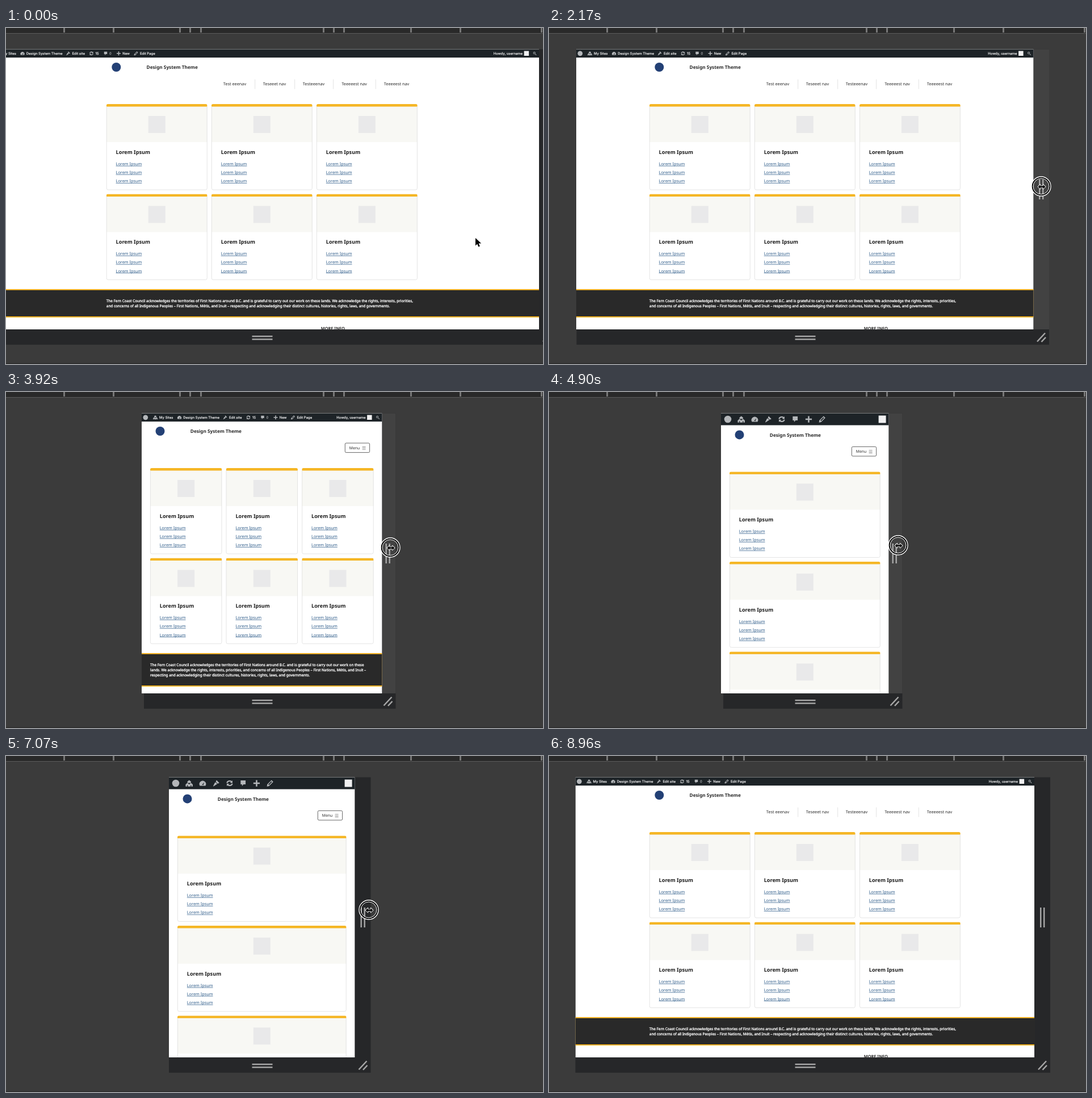
An HTML page with a canvas for the animation above (9100 ms loop, 946x592 px).

```html
<!DOCTYPE html>
<html lang="en">
<head>
<meta charset="utf-8">
<title>Responsive resize</title>
<style>
html, body { margin: 0; width: 100%; height: 100%; overflow: hidden; background: #3b3b3b; }
canvas { display: block; }
</style>
</head>
<body>
<canvas id="stage" width="946" height="592"></canvas>
<script>
const ctx = document.getElementById('stage').getContext('2d');
const LOOP = 9100, STEP = 70;
const SANS = '"Noto Sans", sans-serif', UI = 'Inter, sans-serif';
const GOLD = '#f5b625', INK = '#292929', PANEL = '#262729', GRIP = '#a8a8a8', LINK = '#2c5a88';
const STATEMENT = 'The Fern Coast Council acknowledges the territories of First Nations around B.C. and is grateful to carry out our work on these lands. We acknowledge the rights, interests, priorities, and concerns of all Indigenous Peoples – First Nations, Métis, and Inuit – respecting and acknowledging their distinct cultures, histories, rights, laws, and governments.';

// time, frame left, page left, content shortfall, pointer x, pointer y
const KEYS = [
  [0, -37.5, -37.5, 0, 827, 370],
  [350, -37.5, -37.5, 0, 955, 275],
  [1190, -37.5, -37.5, 0, 955, 275],
  [2170, 48.5, 48, 0, 867, 279],
  [3150, 171, 167, 0, 752, 276],
  [3920, 243, 239, 0, 677, 274],
  [4130, 258, 254, 0, 668, 273],
  [4900, 307, 303, 0, 615, 270],
  [5110, 307, 303, 0, 606, 270],
  [5250, 320, 320, 0, 606, 270],
  [6300, 320, 320, 0, 606, 270],
  [7070, 287, 287, 0, 639, 271],
  [7350, 266, 268, 4, 663, 270],
  [7770, 202, 213.5, 17, 733, 269],
  [8310, 46.5, 46.5, 0, 875, 270],
  [8400, 46.5, 46.5, 0, 868, 290],
  [8820, 46.5, 46.5, 0, 868, 568],
  [LOOP, 46.5, 46.5, 0, 868, 568]
];

// Icons on a 20 x 20 grid
const ICONS = {
  sites: 'M10 1l5 4v4H5V5zM5 9l5 4v6H0v-6zM15 9l5 4v6H10v-6zM4 15h2v4H4zM14 15h2v4h-2z',
  gauge: 'M2 17a9.3 9.3 0 1 1 16 0zM8.5 14l6-7-3 8.5z',
  brush: 'M11 1l8 8-5 2-5-5zM8 7l5 5-2 1-9 6v-2l4-8z',
  refresh: 'M1 9a9 8 0 0 1 15-5l2-2v7h-7l2.5-2.5a5.5 5 0 0 0-9 2.5zM19 11a9 8 0 0 1-15 5l-2 2v-7h7l-2.5 2.5a5.5 5 0 0 0 9-2.5z',
  comment: 'M3 2h14v11h-6l-4 5v-5H3z',
  plus: 'M8 1h4v7h7v4h-7v7H8v-7H1V8h7z',
  pencil: 'M14 1l5 5L7 18l-6 1 1-6zM13.5 4.5L5 13l2 2 8.5-8.5z',
  search: 'M8 2a6 6 0 1 0 0 12a6 6 0 1 0 0-12zM8 4.5a3.5 3.5 0 1 1 0 7a3.5 3.5 0 1 1 0-7zM12 14l2-2 5 5-2 2z'
};
for (const name in ICONS) ICONS[name] = new Path2D(ICONS[name]);

const ARROW = new Path2D('M0 0v13.5l3.2-3 2.1 5 2.5-1.1-2.1-4.8h4.5z');
const RESIZE = new Path2D('M-6.5 0l4-3.8v2.6h5v-2.6l4 3.8-4 3.8v-2.6h-5v2.6z');

function rect(x, y, w, h, color) {
  ctx.fillStyle = color;
  ctx.fillRect(x, y, w, h);
}

function text(str, x, y, size, color, { weight = 400, family = SANS, align = 'left', bleed = 0 } = {}) {
  ctx.font = `${weight} ${size}px ${family}`;
  ctx.textAlign = align;
  ctx.fillStyle = ctx.strokeStyle = color;
  ctx.fillText(str, x, y);
  if (bleed) {
    ctx.lineWidth = bleed;
    ctx.strokeText(str, x, y);
  }
}

function dot(x, y, r, color) {
  ctx.fillStyle = color;
  ctx.beginPath();
  ctx.arc(x, y, r, 0, 7);
  ctx.fill();
}

function ring(x, y, r, width, color) {
  ctx.strokeStyle = color;
  ctx.lineWidth = width;
  ctx.beginPath();
  ctx.arc(x, y, r, 0, 7);
  ctx.stroke();
}

function line(x1, y1, x2, y2, width, color) {
  ctx.strokeStyle = color;
  ctx.lineWidth = width;
  ctx.beginPath();
  ctx.moveTo(x1, y1);
  ctx.lineTo(x2, y2);
  ctx.stroke();
}

function outline(x, y, w, h, r, color, width) {
  ctx.strokeStyle = color;
  ctx.lineWidth = width;
  ctx.beginPath();
  ctx.roundRect(x, y, w, h, r);
  ctx.stroke();
}

function icon(name, x, y, size, color = '#b4b7ba') {
  ctx.save();
  ctx.translate(x - size / 2, y - size / 2);
  ctx.scale(size / 20, size / 20);
  ctx.fillStyle = color;
  ctx.fill(ICONS[name], 'evenodd');
  ctx.restore();
}

function wrap(str, width) {
  const lines = [''];
  for (const word of str.split(' ')) {
    const last = lines[lines.length - 1];
    const longer = last ? last + ' ' + word : word;
    if (ctx.measureText(longer).width > width) lines.push(word);
    else lines[lines.length - 1] = longer;
  }
  return lines;
}

function adminBar(left, right, small) {
  rect(left, 37.5, right - left, small ? 21 : 14.6, '#1d2327');
  if (small) {
    dot(left + 12, 48, 6.3, '#b4b7ba');
    ['sites', 'gauge', 'brush', 'refresh', 'comment', 'plus', 'pencil'].forEach((name, i) =>
      icon(name, left + 35.7 + i * 23.75, 48, 12.5));
    rect(right - 18, 41.5, 13, 13, '#f0f0f1');
    return;
  }
  const style = { weight: 500, family: UI, bleed: .15 };
  dot(left + 6.8, 44.8, 4.4, '#b4b7ba');
  for (const [name, x, label, labelX] of [
    ['sites', 24, 'My Sites', 31], ['gauge', 66.5, 'Design System Theme', 73.3],
    ['brush', 147, 'Edit site', 154], ['refresh', 188, '15', 195],
    ['comment', 213, '0', 219.5], ['plus', 236, 'New', 242.7], ['pencil', 266.5, 'Edit Page', 273.5]
  ]) {
    icon(name, left + x, 44.8, 7.8);
    text(label, left + labelX, 47.1, 5.94, label === '0' ? '#9a9da0' : '#f0f0f1', style);
  }
  text('Howdy, username', right - 29, 47.1, 5.94, '#f0f0f1', { ...style, align: 'right' });
  rect(right - 26.5, 40.5, 8.5, 8.5, '#f0f0f1');
  icon('search', right - 7.7, 44.8, 7);
}

function header(x, right, y, wideNav) {
  dot(x + 17.5, y + 69, 8, '#234075');
  text('Design System Theme', x + 70.8, y + 72.4, 8.22, INK, { weight: 700 });
  if (wideNav) {
    [['Test eeenav', 206], ['Teseeet nav', 276], ['Testeeenav', 346], ['Teeeeest nav', 414.5], ['Teeeeest nav', 489]]
      .forEach(([label, dx]) => text(label, x + dx, y + 101.2, 7.31, INK));
    for (const dx of [261.5, 331.5, 399.5, 474]) rect(x + dx, y + 90.5, .8, 17, '#dcdcdc');
  } else {
    outline(right - 50.3, y + 90, 43.3, 16.6, 2, '#555', .9);
    text('Menu', right - 42.8, y + 101, 6.8, INK);
    for (const dy of [96, 98.4, 100.8]) rect(right - 20, y + dy, 6, .8, '#777');
  }
}

function card(x, y, w) {
  ctx.save();
  ctx.beginPath();
  ctx.roundRect(x, y, w, 151.5, 2.8);
  ctx.clip();
  rect(x, y, w, 67, '#f8f8f4');
  rect(x, y, w, 4.5, GOLD);
  ctx.restore();
  ctx.save();
  ctx.beginPath();
  ctx.rect(x - 1, y + 4.5, w + 2, 148);
  ctx.clip();
  outline(x + .4, y + .4, w - .8, 150.7, 2.8, '#dedede', .8);
  ctx.restore();
  rect(x + w / 2 - 15, y + 21, 30, 30, '#e9e9ea');
  text('Lorem Ipsum', x + 16.8, y + 87.7, 9.13, '#1c1c1c', { weight: 700 });
  for (let i = 0; i < 3; i++) {
    const base = y + 107.8 + i * 15.1;
    text('Lorem Ipsum', x + 16.8, base, 7.31, LINK);
    rect(x + 16.8, base + 1, ctx.measureText('Lorem Ipsum').width, .7, LINK);
  }
}

function footer(left, right, x, width) {
  ctx.font = `400 6.39px ${SANS}`;
  const lines = wrap(STATEMENT, width);
  const bottom = Math.round(490.5 + 8.8 * lines.length);
  rect(left, 460, right - left, bottom - 458, '#f0b023');
  rect(left, 462, right - left, bottom - 462, INK);
  lines.forEach((str, i) => text(str, x, 483.2 + i * 8.7, 6.39, '#fff', { bleed: .3 }));
  text('MORE INFO', x + 378, bottom + 24.4, 7.31, INK, { weight: 700 });
}

function page(left, shortfall) {
  const edge = 901.6 - left, right = edge - shortfall;
  const small = right - left < 357;
  const width = Math.min(548, right - left - 30);
  const x = (left + right - width) / 2;
  const top = small ? 6.4 : 0;
  const columns = small ? 1 : 3, gap = 7.3;
  const cardWidth = (width - gap * (columns - 1)) / columns;

  ctx.save();
  ctx.beginPath();
  ctx.rect(left, 37.5, edge - left, 493.5);
  ctx.clip();
  rect(left, 37, edge - left, 495, '#fff');
  adminBar(left, right, small);
  header(x, x + width, top, width >= 548);
  for (let i = 0; i < 6; i++) {
    const row = Math.floor(i / columns);
    card(x + (i % columns) * (cardWidth + gap), 134 + top + row * 158.5, cardWidth);
  }
  if (!small) footer(left, right, x, width);
  ctx.restore();
}

function backdrop() {
  rect(0, 0, 946, 592, '#3b3b3b');
  rect(0, 0, 946, 9, '#292929');
  rect(0, 9, 946, 1, '#5c5c5c');
  rect(0, 590.5, 946, 1.5, '#2c2c2c');
  for (const x of [102, 189, 306, 324, 343, 559, 577, 595, 713, 800, 943]) rect(x - 1, 0, 3, 8, '#777');
}

function deviceFrame(left, pageLeft, lit) {
  const right = 929.5 - left;
  rect(left, 37.5, right - left, 520.5, PANEL);
  if (lit) rect(901.6 - pageLeft, 37.5, right - 901.6 + pageLeft, 493.5, '#424242');
  for (const y of [542, 547.3]) rect(433.5, y, 36, 2.4, GRIP);
  for (const dx of [18, 12]) rect(right - dx, 267, 2.4, 35, GRIP);
  line(right - 21, 552.5, right - 7, 537.5, 2.5, GRIP);
  line(right - 13.5, 553, right - 6, 545, 2.5, GRIP);
}

function pointer(shape, x, y, border) {
  ctx.save();
  ctx.translate(x, y);
  ctx.lineJoin = 'round';
  ctx.strokeStyle = '#fff';
  ctx.lineWidth = border;
  ctx.stroke(shape);
  ctx.fillStyle = '#000';
  ctx.fill(shape);
  ctx.restore();
}

function pose(t) {
  const i = Math.max(1, KEYS.findIndex(key => key[0] >= t));
  const a = KEYS[i - 1], b = KEYS[i];
  const p = (t - a[0]) / (b[0] - a[0]);
  return a.map((v, k) => v + (b[k] - v) * p);
}

function draw(t) {
  const [, left, pageLeft, shortfall, x, y] = pose(t);
  ctx.textRendering = 'geometricPrecision';
  backdrop();
  deviceFrame(left, pageLeft, t >= 770 && t < 6160);
  page(pageLeft, shortfall);
  if (t >= 560 && t < 8400) {
    ring(x, y, 15.4, 2.6, '#000');
    ring(x, y, 17, 1.3, '#fff');
    ring(x, y, 14, 1, '#fff');
    pointer(RESIZE, x + 1, y + .7, 1.7);
  } else if (t < 350 || (t >= 8400 && t < 8820)) {
    pointer(ARROW, x, y, 2);
  }
}

function tick() {
  const t = performance.now() % LOOP;
  draw(Math.floor(t / STEP) * STEP);
  requestAnimationFrame(tick);
}
tick();
</script>
</body>
</html>
```
